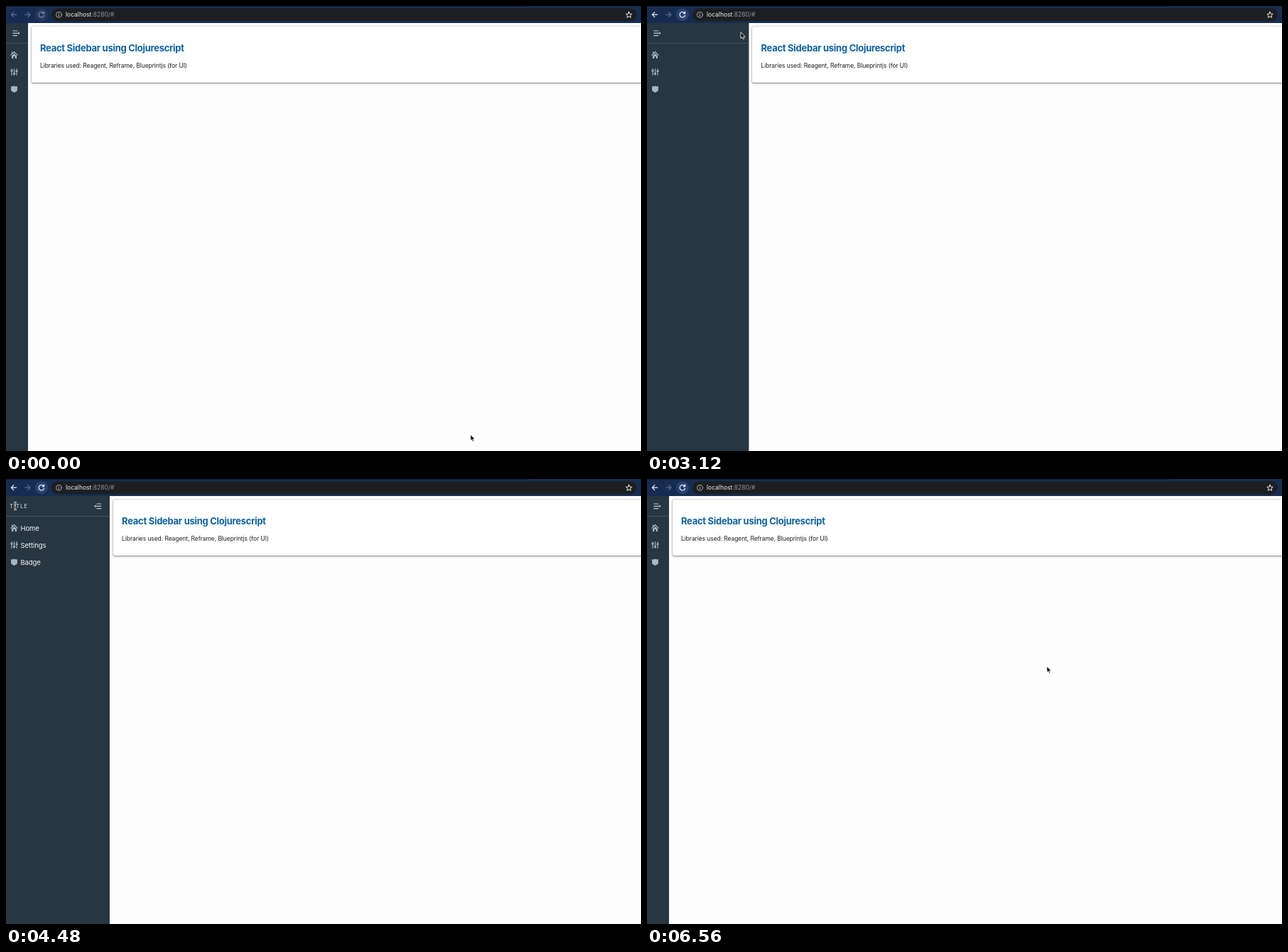
Recreate the animation shown at these times as an HTML page. Size 894 px wide and 627 px high, loop 7.04 s.

```html
<!DOCTYPE html>
<html lang="en">
<head>
<meta charset="utf-8">
<title>Sidebar</title>
<style>
  html, body { margin: 0; width: 100%; height: 100%; overflow: hidden; background: #fdfdfd; }
  #stage { --w: 31px; position: relative; width: 894px; height: 627px; overflow: hidden; }
  #card {
    position: absolute; left: calc(var(--w) + 5px); top: 28.5px; width: 900px; height: 79px;
    background: #fff; border-radius: 2px;
    box-shadow: 0 0 0 .6px rgba(16,22,26,.2), 0 .7px .8px rgba(16,22,26,.35), 0 1.3px 3.5px rgba(16,22,26,.25);
  }
  svg { position: absolute; left: 0; top: 0; }
  text { font-family: Inter, "Open Sans", sans-serif; white-space: pre; }
  #page { transform: translateX(var(--w)); }
  #side { width: var(--w); }
  .line { fill: none; stroke-width: 1.2; stroke-linecap: round; stroke-linejoin: round; }
  .heading { font-size: 13px; font-weight: 700; letter-spacing: -.28px; fill: #0e639e; }
  .sub { font-size: 8.5px; letter-spacing: -.09px; fill: #1b1f22; }
  .url { font-size: 8.5px; fill: #f0f1f2; }
  .label { font-size: 9.5px; letter-spacing: -.1px; fill: #f5f8fa; }
  .title { font-size: 8px; letter-spacing: .8px; fill: #d5dde3; }
  .chrome { stroke: #7f8ba1; }
  .active .chrome { stroke: #eef1f6; }
  #back { stroke: #5d6f91; }
  .active #back { stroke: #eef1f6; }
  #ring { fill: #24395f; }
  .active #ring { fill: #2a4270; }
  #cursor > * { display: none; }
  #cursor[data-kind=arrow] > .arrow,
  #cursor[data-kind=hand] > .hand,
  #cursor[data-kind=beam] > .beam { display: inline; }
</style>
</head>
<body>
<div id="stage">
  <div id="card"></div>
  <svg width="894" height="627" viewBox="0 0 894 627">
    <defs>
      <clipPath id="clip"><rect id="side" y="24" height="603"/></clipPath>
    </defs>

    <g id="page">
      <text class="heading" x="17" y="64">React Sidebar using Clojurescript</text>
      <text class="sub" x="17" y="87">Libraries used: Reagent, Reframe, Blueprintjs (for UI)</text>
    </g>

    <g clip-path="url(#clip)">
      <rect y="24" width="160" height="603" fill="#283642"/>
      <rect y="52" width="160" height="1" fill="#46535e"/>
      <g id="toggle">
        <rect id="hover" x="-9.5" y="-9.5" width="19" height="19" rx="2" fill="#3c4a55"/>
        <g id="glyph" class="line" stroke="#bfccd6">
          <path d="M-4.6-3.3H2M-4.6 0H2M-4.6 3.3H2" stroke-linecap="butt"/>
          <path d="M2 0H4.8M3.4-1.5L5 0L3.4 1.5" stroke-width="1"/>
        </g>
      </g>
      <g fill="#a7b6c2">
        <path d="M11.5 63.8L17 69.2L16.1 70.1L11.5 65.7L6.9 70.1L6 69.2L8 67.2V64.6H9.3V66Z"/>
        <path d="M8 70.3L11.5 67L15 70.3V74H12.7V71H10.3V74H8Z"/>
        <path d="M11.5 112.6C13 113.7 14.2 113.5 15 112.8L16.2 114.2C15.3 115.4 16.4 117.3 15.8 119C15.2 120.8 12.9 120.8 11.5 122.2C10.1 120.8 7.8 120.8 7.2 119C6.6 117.3 7.7 115.4 6.8 114.2L8 112.8C8.8 113.5 10 113.7 11.5 112.6Z"/>
      </g>
      <path d="M8 88V98M11.5 88V98M15 88V98" stroke="#a7b6c2" stroke-width="1.1"/>
      <path d="M6.4 91.3H9.6M9.9 95.2H13.1M13.4 91.8H16.6" stroke="#a7b6c2" stroke-width="2"/>
      <g id="labels">
        <text class="title" x="5" y="41.2">TITLE</text>
        <text class="label" x="20.5" y="72.5">Home</text>
        <text class="label" x="20.5" y="97">Settings</text>
        <text class="label" x="20.5" y="121.3">Badge</text>
      </g>
    </g>

    <g id="bar">
      <rect width="894" height="24" fill="#172c51"/>
      <rect width="734" height="1" fill="#0c1c38"/>
      <rect x="64" y="3.2" width="824" height="18" rx="9" fill="#1c1e21"/>
      <path id="back" class="line" d="M14.6 12.2H7.4M10.8 8.7L7.3 12.2L10.8 15.7"/>
      <path class="line" stroke="#5d6f91" d="M26.8 12.2H34M30.6 8.7L34.1 12.2L30.6 15.7"/>
      <circle id="ring" cx="50" cy="12.2" r="9"/>
      <path class="line chrome" d="M53 9.9A3.8 3.8 0 1 0 53.6 13.3M53.6 8.2V10.6H51.2"/>
      <g class="line" stroke="#b6babf" stroke-width=".9">
        <circle cx="74.4" cy="12.3" r="3.9" stroke-width=".9"/>
        <path d="M74.4 12V14.3M74.4 10.2V10.3" stroke-width="1"/>
      </g>
      <text class="url" x="84" y="15.3">localhost<tspan fill="#93979c">:8280/#</tspan></text>
      <path class="line" stroke="#e6e8ea" style="stroke-width:1"
        d="M877 8.2L878.2 11L881.2 11.3L878.9 13.3L879.6 16.3L877 14.7L874.4 16.3L875.1 13.3L872.8 11.3L875.8 11Z"/>
    </g>

    <g id="cursor" data-kind="arrow">
      <path class="arrow" d="M0 0V8.6L2 6.8L3.3 9.8L4.8 9.1L3.5 6.2H6.1Z" fill="#000" stroke="#fff" stroke-width=".8"/>
      <path class="hand" d="M-.8.6C-.8-.4.8-.4.8.6V3.2L4 4C5 4.3 5.1 5 4.9 6L4.2 9H-.4L-2.7 5.7C-3 4.8-2 4.4-1.4 5L-.8 5.6Z" fill="#111" stroke="#fff" stroke-width=".9"/>
      <g class="beam" fill="none">
        <path d="M-2-5.2Q0-5.2 0-4V4Q0 5.2-2 5.2M2-5.2Q0-5.2 0-4M0 4Q0 5.2 2 5.2M-1.2 1.5H1.2" stroke="#fff" stroke-width="2"/>
        <path d="M-2-5.2Q0-5.2 0-4V4Q0 5.2-2 5.2M2-5.2Q0-5.2 0-4M0 4Q0 5.2 2 5.2M-1.2 1.5H1.2" stroke="#111" stroke-width=".8"/>
      </g>
    </g>
  </svg>
</div>
<script>
  const LOOP = 7040, STEP = 80, SLIDE = 500;
  const CLOSED = 31, OPEN = 149.3;
  const ACTIVATE = 1520;
  // Alternating clicks: open, close, open, close.
  const clicks = [1990, 3087, 4085, 5187];
  // Pointer path: time, x, y.
  const path = [
    [0, 654, 604], [160, 654, 604], [400, 248, 296], [560, 248, 296],
    [720, 42, 95], [800, 42, 95], [1040, 20, 38], [1520, 20, 38],
    [1680, 18, 36], [1920, 18, 36], [2240, 13, 38], [2400, 13, 38],
    [2720, 132, 37], [3440, 132, 37], [3840, 18, 35], [4080, 18, 35],
    [4320, 13, 38], [4480, 13, 38], [4800, 131, 35], [5440, 131, 35],
    [5920, 563, 264]
  ];

  const $ = id => document.getElementById(id);
  const stage = $('stage'), cursor = $('cursor');
  const mix = (a, b, k) => a + (b - a) * k;

  // CSS "ease": cubic-bezier(.25, .1, .25, 1)
  function ease(x) {
    if (x <= 0 || x >= 1) return x <= 0 ? 0 : 1;
    const curve = (a, b, s) => 3 * a * s * (1 - s) ** 2 + 3 * b * s * s * (1 - s) + s ** 3;
    let lo = 0, hi = 1;
    for (let i = 0; i < 24; i++) {
      const mid = (lo + hi) / 2;
      if (curve(.25, .25, mid) < x) lo = mid; else hi = mid;
    }
    return curve(.1, 1, lo);
  }

  function pointer(t) {
    const i = path.findIndex(p => p[0] > t);
    if (i < 0) return path[path.length - 1].slice(1);
    const [t0, x0, y0] = path[i - 1], [t1, x1, y1] = path[i];
    const k = (t - t0) / (t1 - t0);
    return [mix(x0, x1, k), mix(y0, y1, k)];
  }

  function render(t) {
    const done = clicks.filter(c => c <= t).length;
    const open = done % 2 === 1;
    const k = done ? ease((t - clicks[done - 1]) / SLIDE) : 1;
    const w = open ? mix(CLOSED, OPEN, k) : mix(done ? OPEN : CLOSED, CLOSED, k);
    const [x, y] = pointer(t);
    const active = t >= ACTIVATE;
    const bx = open ? w - 16.5 : 14;
    const over = active && Math.abs(x - bx) < 10 && Math.abs(y - 38) < 10;
    const beam = open && x < 31 && y > 30 && y < 46;

    stage.style.setProperty('--w', w + 'px');
    stage.classList.toggle('active', active);
    $('toggle').setAttribute('transform', `translate(${bx} 38.3)`);
    $('glyph').setAttribute('transform', open ? 'scale(-1 1)' : '');
    $('hover').style.display = over ? '' : 'none';
    $('labels').style.display = open ? '' : 'none';
    cursor.dataset.kind = over ? 'hand' : beam ? 'beam' : 'arrow';
    cursor.setAttribute('transform', `translate(${x} ${y})`);
  }

  const start = performance.now();
  function tick() {
    const t = (performance.now() - start) % LOOP;
    render(Math.floor(t / STEP) * STEP);
    requestAnimationFrame(tick);
  }
  tick();
</script>
</body>
</html>
```
